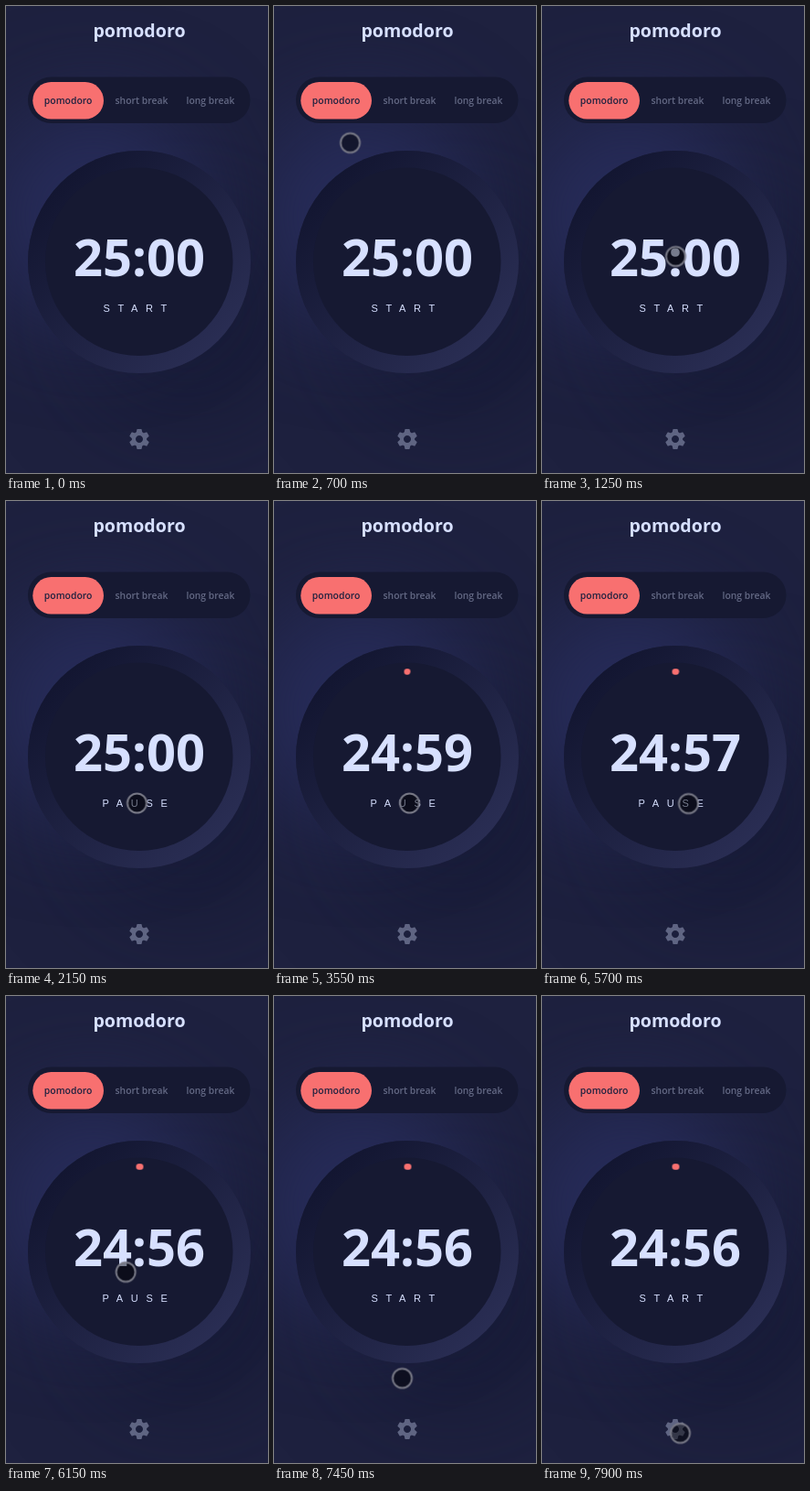
Write an HTML page that moves like this. It is 287x510 px and loops after 8000 ms.

```html
<!DOCTYPE html>
<html lang="en">
<head>
<meta charset="utf-8">
<title>pomodoro</title>
<style>
  html, body { margin: 0; width: 100%; height: 100%; overflow: hidden; background: #1e213f; }
  .stage { position: relative; width: 287px; height: 510px; overflow: hidden; }
  .stage > svg { position: absolute; inset: 0; }
  .dial {
    position: absolute; left: 24px; top: 157.5px; width: 243.5px; height: 243.5px; border-radius: 50%;
    background: linear-gradient(315deg, #2e325a, #0e112a);
    box-shadow: -50px -50px 100px #272c5a, 50px 50px 100px rgba(18, 21, 48, .5);
  }

  text { font-family: "Open Sans", "Noto Sans", sans-serif; fill: #d7e0ff; }
  .mid { text-anchor: middle; }
  .title { font-size: 19.6px; font-weight: 700; }
  .tab { font-size: 10.4px; font-weight: 600; }
  .idle { opacity: .4; }
  .time { font-size: 56px; font-weight: 700; }
  .label { font: 11px "Liberation Sans", Arial, sans-serif; letter-spacing: 8.7px; }

  .times, .labels, .arc, .cursor { animation: 8s steps(1, end) infinite; }
  .times { animation-name: count; }
  .labels { animation-name: toggle; }
  .arc { animation-name: fill; }
  .cursor { animation-name: roam; }

  @keyframes count {
    0% { transform: none; }
    36.875% { transform: translateY(-100px); }
    49.375% { transform: translateY(-200px); }
    61.875% { transform: translateY(-300px); }
    74.375%, 100% { transform: translateY(-400px); }
  }
  @keyframes toggle {
    0% { transform: none; }
    26.25% { transform: translateY(-50px); }
    83.125%, 100% { transform: none; }
  }
  @keyframes fill {
    0% { stroke-dasharray: 1 1500; opacity: 0; }
    36.875% { stroke-dasharray: 1 1500; opacity: 1; }
    49.375% { stroke-dasharray: 2 1500; opacity: 1; }
    61.875% { stroke-dasharray: 3 1500; opacity: 1; }
    74.375%, 100% { stroke-dasharray: 4 1500; opacity: 1; }
  }
  /* every move advances in 50 ms steps, then holds */
  @keyframes roam {
    0% { transform: translate(-99px, 121.5px); }
    7.5% { transform: translate(16.5px, 121.5px); animation-timing-function: steps(2, end); }
    8.75%, 13.125% { transform: translate(83.5px, 149.5px); }
    13.125% { animation-timing-function: steps(4, end); }
    15.625% { transform: translate(146.5px, 273.5px); }
    20.625% { transform: translate(143.5px, 330.5px); }
    26.25%, 43.75% { transform: translate(143.5px, 330px); }
    44.375% { transform: translate(148.5px, 330px); animation-timing-function: steps(4, end); }
    46.875%, 63.75% { transform: translate(176.5px, 332.5px); }
    63.75% { animation-timing-function: steps(2, end); }
    65%, 66.25% { transform: translate(171.5px, 331.5px); }
    66.25% { animation-timing-function: steps(2, end); }
    67.5%, 68.75% { transform: translate(160.5px, 330.5px); }
    68.75% { animation-timing-function: steps(13, end); }
    76.875%, 90% { transform: translate(131.2px, 301.5px); }
    90% { animation-timing-function: steps(5, end); }
    93.125% { transform: translate(140.5px, 417.5px); animation-timing-function: steps(5, end); }
    96.25% { transform: translate(154px, 477px); }
    96.875% { transform: translate(152.5px, 477.5px); }
    98.75%, 100% { transform: translate(151.5px, 477.5px); }
  }
</style>
</head>
<body>
<div class="stage">
  <div class="dial"></div>
  <svg width="287" height="510" viewBox="0 0 287 510">
    <text class="title mid" x="146" y="34">pomodoro</text>

    <rect x="24" y="77.5" width="243.5" height="50.5" rx="25.25" fill="#161932"/>
    <rect x="29.3" y="83" width="77.7" height="40.5" rx="20.25" fill="#f87070"/>
    <text class="tab mid" x="68.1" y="107" style="fill:#1e213f">pomodoro</text>
    <text class="tab mid idle" x="148.5" y="107">short break</text>
    <text class="tab mid idle" x="224" y="107">long break</text>

    <circle cx="145.75" cy="279.25" r="102.8" fill="#161932"/>
    <circle class="arc" cx="145.75" cy="279.25" r="92.8" pathLength="1500" fill="none"
      stroke="#f87070" stroke-width="6.6" stroke-linecap="round" transform="rotate(-90 145.75 279.25)"/>

    <svg x="60" y="240" width="172" height="70">
      <g class="times">
        <text class="time mid" x="86" y="55">25:00</text>
        <text class="time mid" x="86" y="155">24:59</text>
        <text class="time mid" x="86" y="255">24:58</text>
        <text class="time mid" x="86" y="355">24:57</text>
        <text class="time mid" x="86" y="455">24:56</text>
      </g>
    </svg>
    <svg x="90" y="320" width="120" height="20">
      <g class="labels">
        <text class="label" x="16.4" y="14">START</text>
        <text class="label" x="15.5" y="64">PAUSE</text>
      </g>
    </svg>

    <g transform="translate(146 473)" fill="#d7e0ff" opacity=".36">
      <circle r="6.1" fill="none" stroke="#d7e0ff" stroke-width="4.2"/>
      <path id="tooth" d="M-3.4-6.6L-2.7-10.3Q-2.6-11-2-11H2Q2.6-11 2.7-10.3L3.4-6.6z"/>
      <use href="#tooth" transform="rotate(60)"/>
      <use href="#tooth" transform="rotate(120)"/>
      <use href="#tooth" transform="rotate(180)"/>
      <use href="#tooth" transform="rotate(240)"/>
      <use href="#tooth" transform="rotate(300)"/>
    </g>

    <g class="cursor">
      <circle r="10.5" fill="#000" fill-opacity=".45"/>
      <circle r="10.5" fill="none" stroke="#787986" stroke-width="2"/>
    </g>
  </svg>
</div>
</body>
</html>
```
